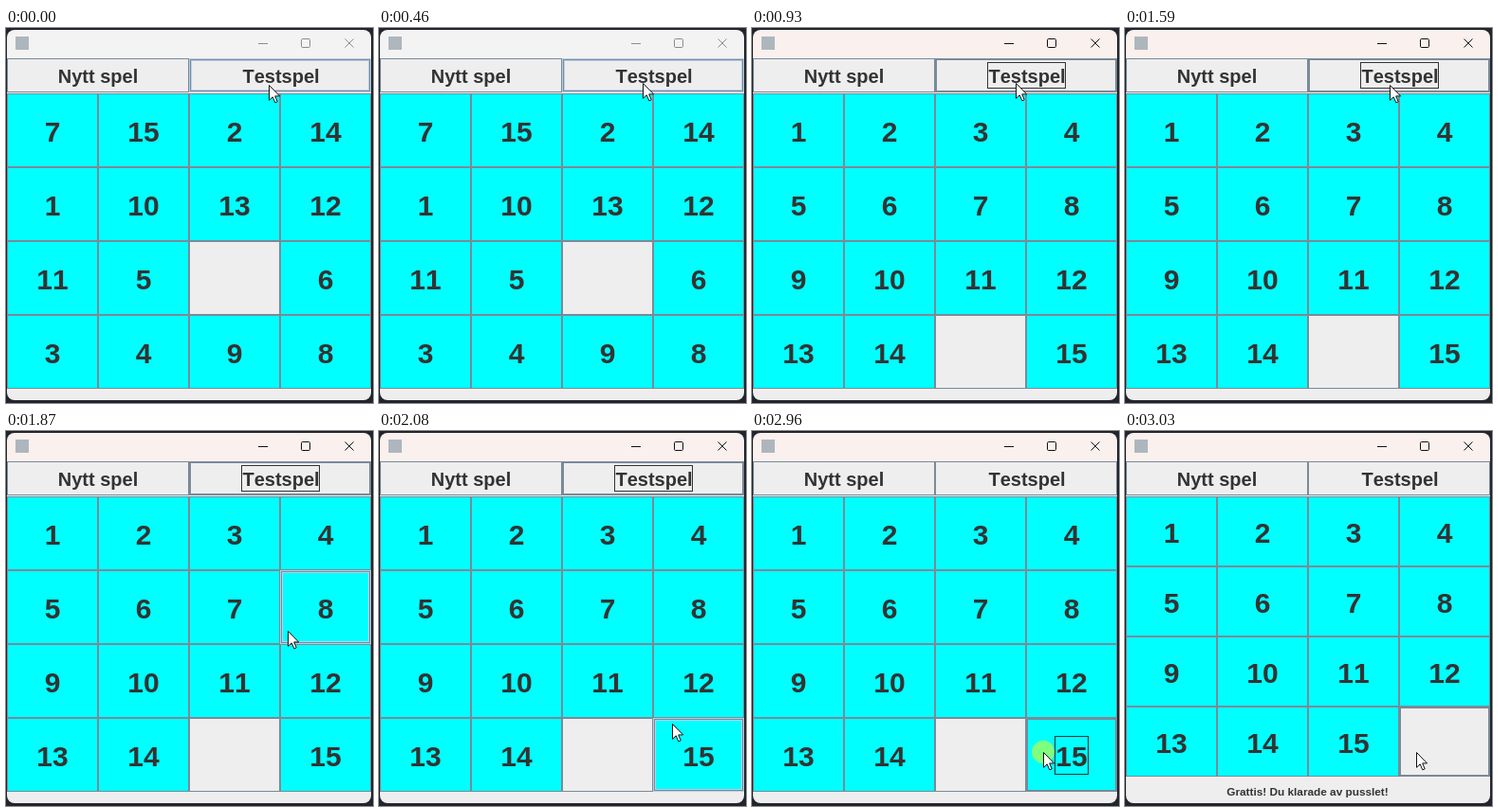
Recreate the animation shown at these times as an HTML page. Size 387 px wide and 396 px high, loop 3.29 s.

```html
<!DOCTYPE html>
<html lang="sv">
<head>
<meta charset="utf-8">
<title>Femtonspel</title>
<style>
  html, body { margin: 0; width: 100%; height: 100%; overflow: hidden; background: #22252d; }
  svg { display: block; width: 387px; height: 396px; }
  text { font-family: "Liberation Sans", Arial, sans-serif; font-weight: bold; fill: #333;
         text-anchor: middle; font-kerning: none; }
  .px { shape-rendering: crispEdges; }
</style>
</head>
<body>
<svg id="stage" viewBox="0 0 387 396"></svg>
<script>
const LOOP = 3290, PRESS = 660, SORT = 790, MOVE = 1590, CLICK = 2960, WIN = 3030;
const LINE = '#7a8a99', GLOW = '#b8cfe5', PANEL = '#eeeeee', TILE = '#00ffff';

const mixed = [7, 15, 2, 14, 1, 10, 13, 12, 11, 5, 0, 6, 3, 4, 9, 8];
const nearly = [1, 2, 3, 4, 5, 6, 7, 8, 9, 10, 11, 12, 13, 14, 0, 15];
const solved = [1, 2, 3, 4, 5, 6, 7, 8, 9, 10, 11, 12, 13, 14, 15, 0];

// [time, x, y] of the pointer tip
const path = [[0, 277, 60], [130, 278, 60], [260, 278, 59], [460, 278, 58]];
for (let i = 0; i < 8; i++) {
  const k = i / 7, e = k * k * (3 - 2 * k);
  path.push([MOVE + 70 * i, Math.round(279 + 30 * e), Math.round(60 + 249 * e)]);
}
path.push([2150, 308, 315], [2220, 306, 323], [2290, 304, 330],
          [2360, 303, 335], [2430, 305, 338], [2500, 307, 339]);

const titles = [[0, '#f4f3f3'], [720, '#f5f3f2'], [790, '#f7f2f0'], [860, '#f9f1ef'], [930, '#faf0ee']];
const marks = [...new Set([...path, ...titles].map(s => s[0]).concat(PRESS, SORT, CLICK, WIN))]
  .sort((a, b) => a - b);

const at = (steps, t) => steps.filter(s => s[0] <= t).pop();
const box = (x, y, w, h, fill) =>
  `<rect class="px" x="${x}" y="${y}" width="${w}" height="${h}" fill="${fill}"/>`;
const frame = (x, y, w, h, color) =>
  `<rect class="px" x="${x + .5}" y="${y + .5}" width="${w - 1}" height="${h - 1}" fill="none" stroke="${color}"/>`;
const label = (x, y, size, str) => `<text x="${x}" y="${y}" font-size="${size}">${str}</text>`;

function button(x, y, w, h, fill, look) {
  const ring = (inset, color) => frame(x + inset, y + inset, w - 2 * inset, h - 2 * inset, color);
  let out = box(x, y, w, h, fill);
  if (look === 'hover') out += ring(0, GLOW) + ring(1, LINE) + ring(2, GLOW);
  else out += ring(0, LINE) + (look === 'focus' ? ring(1, LINE) : '');
  return out;
}

function titleBar(t) {
  const ink = t < PRESS ? '#8c8c8c' : '#111';
  return `<path d="M1 32V10a8 8 0 0 1 8-8H377a8 8 0 0 1 8 8V32Z" fill="${at(titles, t)[1]}"/>` +
    box(10, 9, 14, 14, '#aeb6bd') +
    `<g fill="none" stroke="${ink}"><path d="M266 16.5H276"/>` +
    `<rect x="311.5" y="11.5" width="9" height="9" rx="1.2"/>` +
    `<path d="M357.5 11.5l9 9m0-9l-9 9"/></g>`;
}

function board(t, mx, my) {
  const tiles = t < SORT ? mixed : t < WIN ? nearly : solved;
  const h = t < WIN ? 78 : 74;
  return tiles.map((n, i) => {
    const x = 1 + 96 * (i % 4), y = 69 + h * Math.floor(i / 4);
    const over = mx >= x && mx < x + 96 && my >= y && my < y + h;
    const look = t >= CLICK && i === 15 ? 'focus' : over ? 'hover' : '';
    return button(x, y, 96, h, n ? TILE : PANEL, look) +
      (n ? label(x + 48, y + h / 2 + 12, 30, n) : '');
  }).join('');
}

function pointer(t, x, y) {
  const down = (t >= PRESS && t < SORT) || (t >= CLICK && t < WIN);
  return (down ? `<circle cx="${x}" cy="${y}" r="12" fill="#ff0" fill-opacity=".5"/>` : '') +
    `<path transform="translate(${x} ${y})" d="M.5.5V16.3L4.2 12.8L6.8 18.8L9.2 17.8L6.7 11.9H11.6Z"
      fill="#fff" stroke="#111" stroke-linejoin="round"/>`;
}

function draw(t) {
  const [, mx, my] = at(path, t);
  const chosen = t >= PRESS && t < CLICK;
  return '<path d="M1 30H385V385a8 8 0 0 1-8 8H9a8 8 0 0 1-8-8Z" fill="' + PANEL + '"/>' +
    titleBar(t) +
    button(1, 32, 192, 36, PANEL, '') +
    button(193, 32, 192, 36, PANEL, chosen ? 'focus' : t < PRESS ? 'hover' : '') +
    label(97, 58, 20, 'Nytt spel') + label(290, 58, 20, 'Testspel') +
    (chosen ? frame(248, 36, 83, 28, '#333') : '') +
    board(t, mx, my) +
    (t >= CLICK && t < WIN ? frame(319, 322, 36, 41, '#333') : '') +
    (t >= WIN ? label(192.5, 385, 11.8, 'Grattis! Du klarade av pusslet!') : '') +
    pointer(t, mx, my);
}

const stage = document.getElementById('stage');
const start = performance.now();
let shown = -1;
function tick() {
  const t = (performance.now() - start) % LOOP;
  const step = marks.filter(m => m <= t).pop();
  if (step !== shown) stage.innerHTML = draw(shown = step);
  requestAnimationFrame(tick);
}
tick();
</script>
</body>
</html>
```
